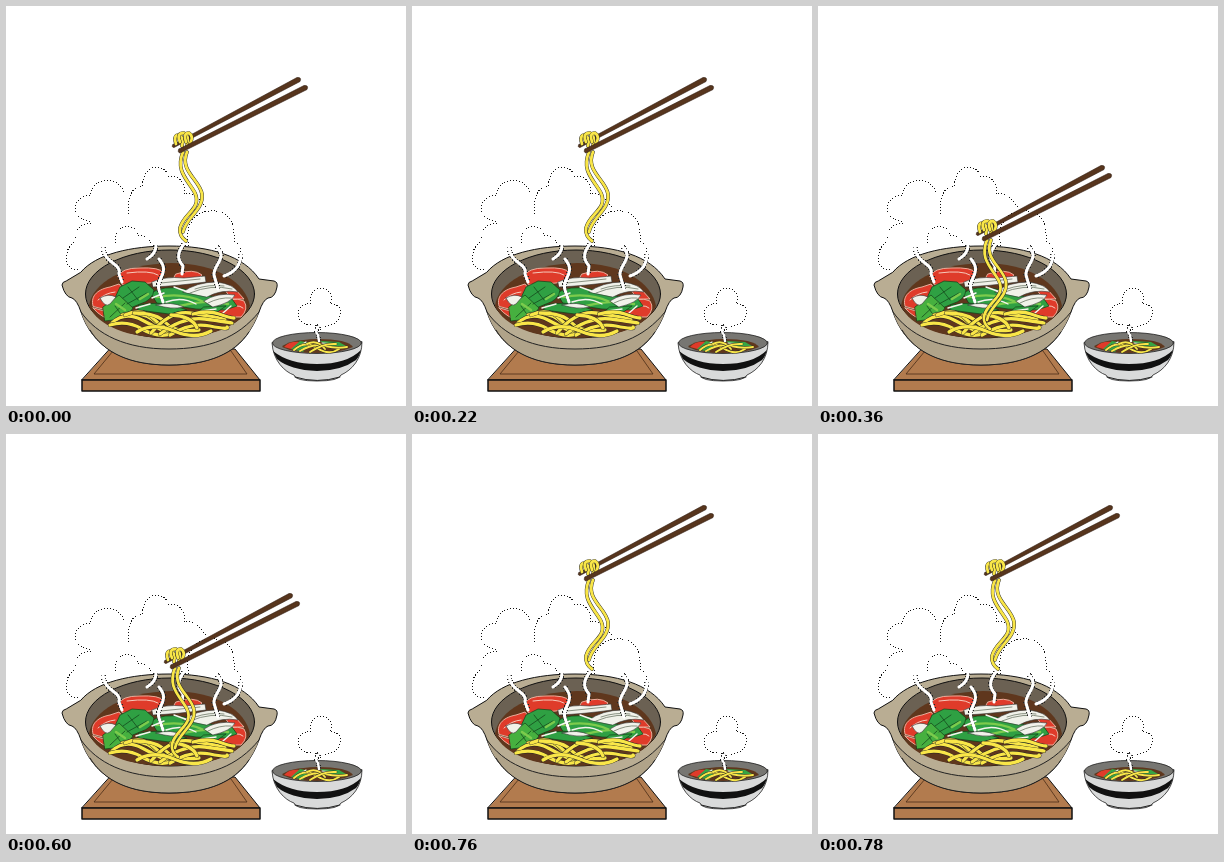
Write an HTML page that moves like this. It is 400x400 px and loops after 800 ms.

```html
<!DOCTYPE html>
<html>
<head>
<meta charset="utf-8">
<style>
html, body { margin: 0; width: 100%; height: 100%; overflow: hidden; background: #fff; }
svg { display: block; width: 100vw; height: 100vh; }
path, ellipse { stroke-linejoin: round; stroke-linecap: round; }
.ink { stroke: #111; stroke-width: 1; }
.line { fill: none; stroke: #222; stroke-width: 1; }
.cloud { fill: none; stroke: #111; shape-rendering: crispEdges; }
.cloud path { stroke-dasharray: 1 2; stroke-linecap: butt; }
</style>
</head>
<body>
<svg viewBox="0 0 400 400">
  <!-- steam clouds -->
  <g class="cloud">
    <path d="M84 216C73 213 67 207 70 198Q74 189 84 190C85 179 93 174 103 174Q115 176 118 187"/>
    <path d="M123 208C120 192 126 180 137 180C136 168 143 161 151 161Q161 163 163 171C172 168 180 177 178 188Q191 186 200 202"/>
    <path d="M85 217C73 218 67 225 70 235C62 239 59 248 61 258Q64 263 72 264"/>
    <path d="M109 237C109 226 114 220 122 220Q131 222 132 230Q143 229 145 239"/>
    <path d="M183 240Q179 225 187 213C194 204 211 202 220 209Q229 216 228 235Q235 240 235 248"/>
    <path d="M313 325Q311 318 306 318C296 321 288 309 295 301Q299 297 305 298C303 288 308 282 316 282C325 283 327 291 324 298C333 297 337 305 333 312C328 321 319 319 313 325"/>
  </g>

  <!-- stand -->
  <g class="ink">
    <path fill="#b27b4e" d="M104 343H229L254 374H76Z"/>
    <path fill="#b27b4e" d="M76 374H254V385H76Z" stroke-width="1.5"/>
    <path fill="#b27b4e" d="M107 345L88 368H241L225 345Z" stroke="#4a2c17" stroke-width=".8"/>
  </g>

  <!-- pot -->
  <path class="ink" fill="#b9ad93" d="M75 266C90 248 125 240 163 240C204 240 238 250 253 273L268 275Q272 276 271 281Q269 292 262 292Q257 294 253 306C240 342 211 359 163 359C116 359 86 340 75 306Q71 294 66 292Q59 291 56 279Q56 276 60 275Z"/>
  <path fill="#b0a389" d="M75 306C86 340 116 359 163 359C211 359 240 342 253 306C232 332 203 343 163 343C120 343 91 329 75 306Z"/>
  <path class="line" d="M75 306C91 329 120 343 163 343C203 343 232 332 253 306"/>
  <path class="line" stroke-width="2" d="M84 324C98 347 124 359 163 359C202 359 229 348 243 326"/>
  <ellipse class="ink" cx="164" cy="288" rx="84.5" ry="44" fill="#6b6153"/>
  <path fill="#5f371d" d="M83 300C86 277 118 258 165 257C211 257 240 277 244 300C235 321 203 332 163 332C122 332 92 320 83 300Z"/>

  <!-- meat -->
  <g fill="#df3b2a" stroke="#f0b9a8" stroke-width=".9">
    <path d="M87 300C84 289 93 283 104 281L113 278L121 288L98 303Z"/>
    <path d="M112 270Q116 262 133 262Q154 261 158 267Q156 275 144 277L117 279Z"/>
    <path d="M170 268Q188 262 196 269L190 275L167 274Z"/>
    <path d="M209 301Q226 289 238 295Q243 303 235 311L214 311Z"/>
    <path d="M217 281L229 283L238 293L226 293Z"/>
    <path d="M87 302Q95 312 109 315L104 307Z"/>
  </g>
  <path fill="none" stroke="#f6c9bb" d="M92 294Q99 287 109 286M121 267Q144 264 152 269M221 303Q231 297 237 302"/>

  <!-- greens -->
  <g fill="#2fa043" stroke="#123f18" stroke-width=".7">
    <path d="M145 287Q157 279 178 283L203 290L226 293L231 300L219 304L190 303L151 297Z"/>
    <path d="M108 294L114 281L126 275L139 276L148 284Q147 294 134 298L117 305Z"/>
    <path fill="#46b03f" d="M97 301L113 289L127 302Q121 314 99 315Z"/>
    <path d="M133 299Q157 294 181 304L163 308L132 304Z"/>
    <path d="M198 301L220 300L207 309L190 308Z"/>
  </g>
  <path fill="none" stroke="#164b1d" stroke-width=".8" d="M117 292L133 281M121 298L141 287M122 281L132 294M104 311L119 297M109 300L114 307"/>
  <path fill="none" stroke="#7ccb4c" stroke-width="2.4" d="M151 291Q177 286 198 296M174 300Q202 293 222 298M134 293L142 288M110 298L119 304"/>

  <!-- pale slices -->
  <g fill="#f1f2ea" stroke="#333" stroke-width=".6">
    <path d="M146 276Q158 270 178 272L199 270L200 276Q171 280 147 281Z"/>
    <path d="M177 286Q190 276 211 276Q227 278 232 286Q215 283 201 291Z"/>
    <path d="M198 295Q211 286 229 289Q225 297 207 301Z"/>
    <path d="M94 292Q102 287 110 291L104 298Q99 302 94 292Z"/>
    <path d="M150 299Q165 295 178 301Q166 304 150 299Z"/>
  </g>
  <path fill="none" stroke="#6d7866" stroke-width=".8" d="M184 287Q205 278 226 283M189 283Q203 278 218 280M202 297Q214 291 225 292M155 277L194 273"/>
  <path fill="none" stroke="#f5f5ee" stroke-width="1.4" d="M146 292L158 287M160 296Q176 290 190 298M168 281L182 286M196 305L210 303M130 302L144 298M225 300L217 307"/>

  <g id="potNoodles"></g>
  <g id="steam"></g>

  <!-- small bowl -->
  <path fill="#d9dada" stroke="#222" stroke-width=".8" d="M266 337C267 355 279 366 288 369Q289 375 311 375Q333 375 335 369C346 364 356 353 356 336Z"/>
  <path fill="#111" d="M267 345Q283 358 311 358Q341 358 355 344Q353 351 350 354Q335 365 311 365Q284 364 271 353Z"/>
  <path class="line" stroke-width="1.4" d="M289 371Q311 378 334 371"/>
  <ellipse cx="311" cy="337" rx="44.5" ry="10.5" fill="#777672" stroke="#222" stroke-width=".8"/>
  <path fill="#5f371d" d="M276 341Q281 334 311 333Q342 333 347 341Q333 347 311 347Q288 347 276 341Z"/>
  <path fill="#df3b2a" d="M278 341Q283 335 294 336L289 344Z"/>
  <path fill="#35a544" d="M285 343L294 335L304 337L297 346ZM314 335L333 336L340 340L323 341Z"/>
  <path fill="none" stroke="#f1f2ea" stroke-width="1.2" d="M290 342L300 336M316 337L330 338"/>
  <g id="bowlNoodles"></g>
  <g id="bowlSteam"></g>

  <!-- lifted noodles and chopsticks -->
  <g id="lift">
    <path fill="#57351d" stroke="#2e1a0e" stroke-width=".6" d="M167 138.5L291 71.5Q296 71 294 75.5L168 141.5Q165 141 167 138.5Z"/>
    <g id="strand"></g>
    <path fill="#57351d" stroke="#2e1a0e" stroke-width=".6" d="M173 143L298 79.5Q303 79 301 83.5L174 147Q171 146 173 143Z"/>
  </g>
</svg>
<script>
const el = id => document.getElementById(id);

// Each path gets a wide under-stroke as its outline and a thinner stroke as its body.
function tubes(id, width, color, edge, paths) {
  el(id).innerHTML = paths.map(d =>
    `<path d="${d}" fill="none" stroke="#222" stroke-width="${width + edge}"/>` +
    `<path d="${d}" fill="none" stroke="${color}" stroke-width="${width}"/>`).join("");
}

function wisps(id, width, paths) {
  tubes(id, width, "#fff", 2, paths);
  for (const p of el(id).querySelectorAll("path:nth-child(odd)")) {
    p.style.strokeDasharray = "1.2 1.8";
    p.style.strokeLinecap = "butt";
    p.style.shapeRendering = "crispEdges";
  }
}

const yellow = "#f9e648";

tubes("potNoodles", 3.3, yellow, .8, [
  "M116 309Q137 303 153 319",
  "M106 317Q119 305 136 314T165 328",
  "M104 319Q121 314 136 323T165 328",
  "M119 309Q137 301 149 314T181 326",
  "M128 307Q151 307 160 317T193 324",
  "M145 327Q165 304 184 307T219 313",
  "M154 328Q177 310 199 313T226 317",
  "M164 329Q184 316 204 320T221 321",
  "M165 309Q186 310 191 322",
  "M187 308Q202 304 213 308T228 312",
  "M131 326Q147 316 168 325T205 325"
]);
tubes("bowlNoodles", 2, yellow, .6, [
  "M288 344Q299 334 311 342T333 343",
  "M294 345Q307 337 319 340T341 341",
  "M301 338Q311 333 319 343",
  "M304 346Q317 337 330 338"
]);
wisps("steam", 3, [
  "M97 241C98 258 116 257 113 268L116 276",
  "M150 239Q150 248 141 253",
  "M153 253C165 267 149 273 153 284L157 296",
  "M178 238C169 249 173 255 177 260L176 268",
  "M211 241C222 252 207 259 208 269L212 283",
  "M235 248Q235 264 218 270"
]);
wisps("bowlSteam", 2.4, ["M313 320Q308 325 312 329L313 335"]);
tubes("strand", 2.8, yellow, .8, [
  "M177 146C169 165 182 174 189 187C196 203 178 207 174 222Q173 230 180 235",
  "M181 146C173 165 194 174 196 188C198 204 180 211 177 226",
  "M170 138Q167 129 173 129Q178 131 176 140",
  "M174 136Q170 127 178 127Q184 130 181 140",
  "M180 136Q177 127 183 127Q188 130 184 138"
]);

function frame(now) {
  const t = now % 800;
  const dipped = t >= 360 && t < 760;
  el("lift").setAttribute("transform", dipped ? "translate(-8 88)" : "translate(0 0)");
  requestAnimationFrame(frame);
}
frame(0);
</script>
</body>
</html>
```
